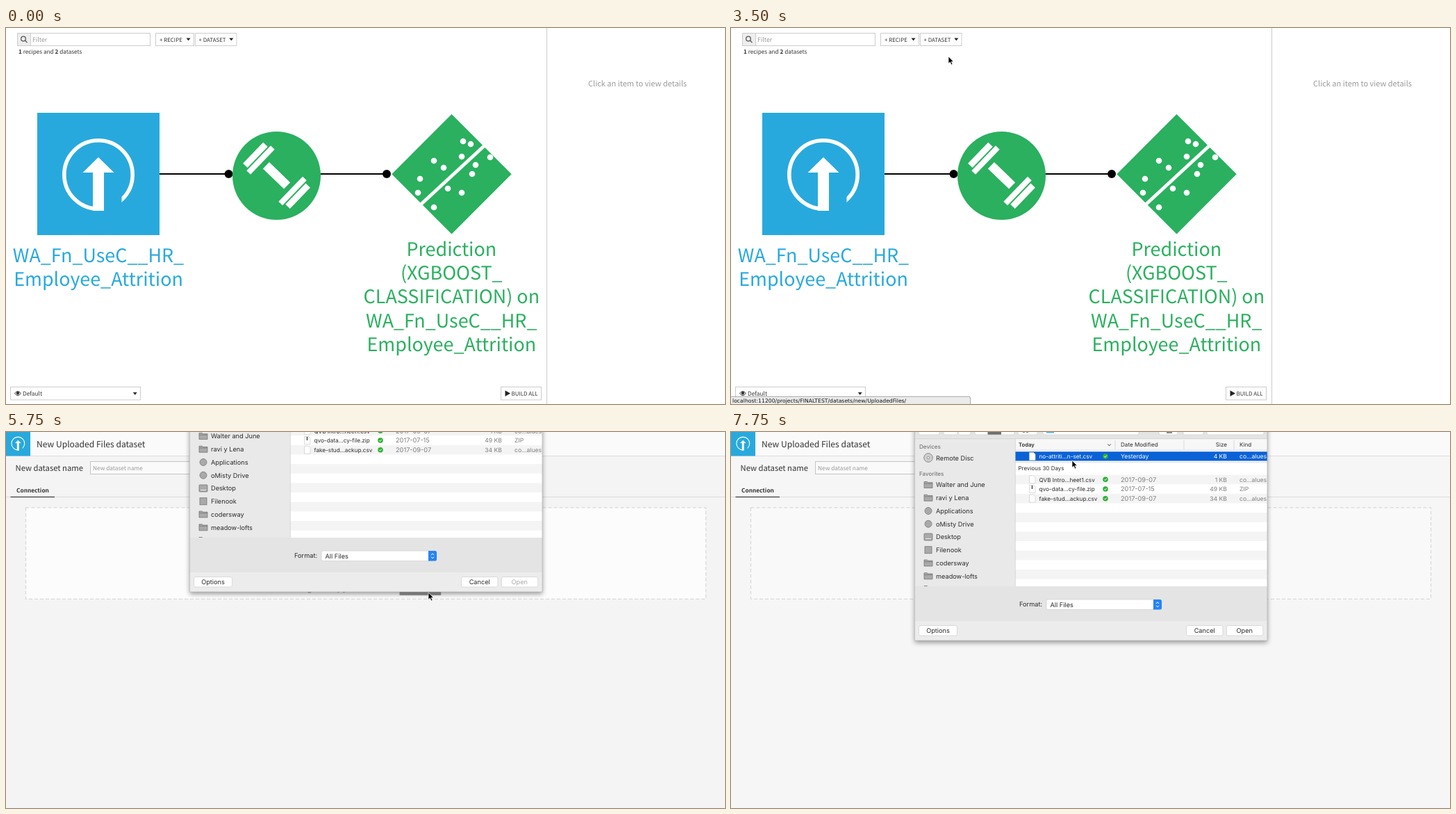
An HTML page that plays this animation: 1035x541 px, repeating every 8000 ms.

```html
<!DOCTYPE html>
<html lang="en">
<head>
<meta charset="utf-8">
<title>Dataset upload</title>
<style>
html, body { margin: 0; width: 100%; height: 100%; overflow: hidden; background: #fff; }
svg { display: block; width: 1035px; height: 541px; }
text { font-family: 'Noto Sans CJK JP', 'Noto Sans CJK SC', 'Noto Sans', sans-serif; font-size: 8.3px; fill: #333; text-rendering: geometricPrecision; white-space: pre; }
.big text { font-size: 26.9px; text-anchor: middle; }
.blue { fill: #28a9dd; }
.green, .big .green { fill: #2ab05f; }
.big .blue { fill: #28a9dd; }
.btn { font-size: 7.9px; }
.light { font-weight: 300; }
.box { fill: #fff; stroke: #ccc; }
.mac text { font-family: Inter, Roboto, sans-serif; font-size: 9.2px; fill: #2b2b2b; }
.mac .small { font-size: 8.1px; }
.mac .cell { font-size: 8.6px; fill: #7d7d7d; }
.mac .file { font-size: 8.2px; }
.mac .end { text-anchor: end; }
.mac .head { font-size: 8.1px; font-weight: 500; fill: #777; }
.ctl { fill: #fff; stroke: #cfcfcf; stroke-width: .7; }
.icon { fill: #a9a9a9; stroke: #777; stroke-width: .8; }

/* Every change lands on a 250 ms step: 3.125% of the loop */
.a { animation: 8s step-end infinite; }
#flow { animation-name: flow; }
#page { animation-name: page; }
#loading { animation-name: loading; }
#tabOn { animation-name: settled; }
#tabOff { animation-name: unsettled; }
#drop { animation-name: lift; }
#spin { animation-name: spin; transform-origin: 518px 262.5px; }
#status { animation-name: status; }
#sheet { animation-name: sheet; }
#cursor { animation-name: cursor; }
#back { animation-name: back; }
#zone { animation-name: zone; }
.pick { animation-name: pick; }
#bar { animation-name: bar; }
#open { animation-name: open; }

@keyframes flow { 0% { opacity: 1 } 46.875%, to { opacity: 0 } }
@keyframes page { 0% { opacity: 0 } 46.875%, to { opacity: 1 } }
@keyframes loading { 0% { opacity: 1 } 53.125%, to { opacity: 0 } }
@keyframes settled { 0% { opacity: 0 } 53.125%, to { opacity: 1 } }
@keyframes unsettled { 0% { opacity: 1 } 53.125%, to { opacity: 0 } }
@keyframes lift { 0% { transform: translateY(1.5px) } 53.125%, to { transform: none } }
@keyframes spin { 0% { transform: rotate(0deg) } 50%, to { transform: rotate(120deg) } }
@keyframes status { 0% { opacity: 0 } 37.5% { opacity: 1 } 56.25%, to { opacity: 0 } }
@keyframes sheet {
  0% { transform: translateY(-330px) }
  68.75% { transform: translateY(-220px) }
  71.875% { transform: translateY(-70px) }
  75% { transform: translateY(-4px) }
  78.125%, to { transform: none }
}
@keyframes back { 93.75%, to { fill: #f6f6f6 } }
@keyframes zone { 0% { fill: #f7f7f7 } 53.125% { fill: #fcfcfc } 93.75%, to { fill: #f9f9f9 } }
@keyframes pick { 93.75%, to { fill: #fff } }
@keyframes bar { 0% { opacity: 0 } 93.75%, to { opacity: 1 } }
@keyframes open { 0% { fill: #aaa } 93.75%, to { fill: #2b2b2b } }
@keyframes cursor {
  0% { transform: translate(-30px, -30px) }
  9.375% { transform: translate(591px, 1px) }
  12.5% { transform: translate(500px, 78px) }
  15.625% { transform: translate(400px, 58px) }
  18.75% { transform: translate(338px, 28px) }
  21.875% { transform: translate(321px, 19px) }
  31.25% { transform: translate(321px, 20px) }
  34.375% { transform: translate(318px, 29px) }
  37.5% { transform: translate(314px, 38px) }
  40.625% { transform: translate(313px, 40px) }
  43.75% { transform: translate(313px, 41px) }
  50% { transform: translate(330px, 55px) }
  53.125% { transform: translate(410px, 118px) }
  56.25% { transform: translate(520px, 195px) }
  59.375% { transform: translate(600px, 253px) }
  62.5% { transform: translate(621.5px, 270px) }
  65.625% { transform: translate(608px, 231px) }
  84.375% { transform: translate(597px, 200px) }
  87.5% { transform: translate(556px, 118px) }
  90.625% { transform: translate(510px, 56px) }
  93.75% { transform: translate(491px, 38px) }
  96.875%, to { transform: translate(491px, 41px) }
}
</style>
</head>
<body>
<svg viewBox="0 0 1035 541">
  <defs>
    <g id="upload">
      <circle cx="133" cy="211" r="49.2" fill="none" stroke="#fff" stroke-width="5.6"/>
      <path class="blue" d="M140 232H166.5V266H140Z"/>
      <path fill="#fff" d="M133 186L155.500 208H141V263H125V208H110.500Z"/>
    </g>
    <g id="plates" fill="#fff">
      <rect x="28" y="-25" width="8" height="50"/>
      <rect x="38" y="-21" width="9" height="42"/>
    </g>
    <path id="caret" d="M-3 -1.700H3L0 2Z" fill="#222"/>
    <path id="folder" class="icon" d="M-6 -4.500H-1.500L-.5 -3.300H6V4.500H-6ZM-6 -1.800H6"/>
    <g id="ok">
      <circle r="3.800" fill="#2eb135"/>
      <path d="M-1.800 0L-.5 1.400L1.800 -1.300" fill="none" stroke="#fff"/>
    </g>
    <path id="doc" d="M-4 -5.500H2L4.500 -3V5.500H-4Z" fill="#fff" stroke="#ccc" stroke-width=".7"/>
    <pattern id="stripes" y="61.500" width="363" height="27.300" patternUnits="userSpaceOnUse">
      <path fill="#f4f4f4" d="M0 0H363V13.650H0Z"/>
    </pattern>
    <filter id="shade" x="-5%" y="-5%" width="110%" height="112%">
      <feDropShadow dx="0" dy="3" stdDeviation="3.500" flood-opacity=".4"/>
    </filter>
  </defs>

  <g id="flow" class="a">
    <path fill="#fff" d="M0 0H1035V541H0Z"/>
    <path d="M778.500 0V541" stroke="#ccc"/>
    <rect class="box" x="16.500" y="7.500" width="191" height="18"/>
    <path d="M17 8H35V25H17Z" fill="#eee"/>
    <path d="M35.500 8V25" stroke="#ccc"/>
    <g fill="none" stroke="#555" stroke-width="1.300"><circle cx="25" cy="15.500" r="3.300"/><path d="M27.500 18L30.500 21"/></g>
    <text x="38" y="19.700" style="font-size:8.800px;fill:#999">Filter</text>
    <rect class="box" x="215.500" y="7.500" width="55" height="18"/>
    <rect class="box" x="272.500" y="7.500" width="59.500" height="18"/>
    <text class="btn" x="221" y="19.500">+ RECIPE</text>
    <text class="btn" x="277.500" y="19.500">+ DATASET</text>
    <use href="#caret" x="262.500" y="16.300"/>
    <use href="#caret" x="324.300" y="16.300"/>
    <text x="18" y="37" style="font-size:8.200px"><tspan font-weight="700">1</tspan> recipes and <tspan font-weight="700">2</tspan> datasets</text>
    <text class="light" x="838" y="84" style="font-size:11px;fill:#999">Click an item to view details</text>

    <path class="blue" d="M45 122H221V298H45Z"/>
    <use href="#upload"/>
    <path d="M221 210H320M452 210H548" stroke="#000" stroke-width="2"/>
    <circle cx="320.500" cy="210" r="6"/>
    <circle cx="548" cy="210" r="6"/>
    <circle class="green" cx="389.500" cy="212.500" r="63.500"/>
    <g transform="translate(389.500 212.300) rotate(44)">
      <use href="#plates"/>
      <use href="#plates" transform="scale(-1 1)"/>
      <rect x="-21" y="-6.500" width="42" height="13" fill="#fff"/>
    </g>
    <path class="green" d="M641.500 124L727.700 210.200L641.500 296.500L555.300 210.200Z"/>
    <path d="M597 254L689 169" stroke="#fff" stroke-width="5"/>
    <g id="dots" fill="#fff"></g>
    <g class="big">
      <text class="blue" x="133" y="337">WA_Fn_UseC__HR_</text>
      <text class="blue" x="133" y="371.300">Employee_Attrition</text>
      <text class="green" x="641.300" y="327.700">Prediction</text>
      <text class="green" x="641.300" y="362">(XGBOOST_</text>
      <text class="green" x="641.300" y="396.300">CLASSIFICATION) on</text>
      <text class="green" x="641.300" y="430.600">WA_Fn_UseC__HR_</text>
      <text class="green" x="641.300" y="464.900">Employee_Attrition</text>
    </g>

    <rect class="box" x="6.500" y="516.500" width="187" height="18.500"/>
    <path d="M12.500 525.700Q17 519.800 21.500 525.700Q17 531.600 12.500 525.700Z" fill="none" stroke="#333"/>
    <circle cx="17" cy="525.300" r="2.200" fill="#333"/>
    <text x="24" y="529">Default</text>
    <use href="#caret" x="185.700" y="526"/>
    <rect class="box" x="712.500" y="516.500" width="58" height="18.500"/>
    <path d="M718.500 521.500L726 525.700L718.500 530Z" fill="#222"/>
    <text class="btn" x="727.500" y="529">BUILD ALL</text>
  </g>

  <g id="page" class="a">
    <path id="back" class="a" fill="#f4f4f4" d="M0 0H1035V541H0Z"/>
    <path fill="#fafafa" d="M0 0H1035V34H0Z"/>
    <path d="M0 34.500H1035" stroke="#ddd"/>
    <path class="blue" d="M0 0H35V34.500H0Z"/>
    <use href="#upload" transform="translate(-8.100 -23.800) scale(.191)"/>
    <text class="light" x="44" y="22.300" style="font-size:12.100px">New Uploaded Files dataset</text>
    <text x="13.500" y="56" style="font-size:11.250px">New dataset name</text>
    <rect x="121.500" y="42.500" width="148" height="18" fill="#fafafa" stroke="#c4c4c4"/>
    <text x="125" y="55" style="fill:#999">New dataset name</text>
    <path d="M272 42.500H318.700V60H272Z" fill="#8bc28a"/>
    <path d="M277.500 48H282.500L284 49.500V54.500H277.500ZM279 48V50.500H282M279 54.500V52H282.500V54.500" fill="none" stroke="#fff" stroke-width=".8"/>
    <text class="btn" x="285.300" y="54.200" style="fill:#fff">CREATE</text>

    <g id="tabOff" class="a">
      <text x="15.700" y="87.500">Connection</text>
      <path d="M0 95H1035" stroke="#dcdcdc"/>
    </g>
    <g id="tabOn" class="a">
      <text x="15" y="87" font-weight="700">Connection</text>
      <path d="M0 93.500H1035" stroke="#dcdcdc"/>
      <path d="M6.500 93.500H70" stroke="#555" stroke-width="1.500"/>
    </g>
    <g id="drop" class="a">
      <rect id="zone" class="a" x="28.500" y="108.800" width="979" height="131.500" stroke="#d9d9d9" stroke-width="1.300" stroke-dasharray="5 3"/>
      <text class="light" x="518.500" y="181.300" text-anchor="middle" style="font-size:13.800px;fill:#999">No file yet</text>
      <text x="418.500" y="229" style="font-size:9.700px;fill:#555">Drag and drop your files here or</text>
      <path d="M566.500 216.500H626.200V235H566.500Z" fill="#999"/>
      <text x="573.500" y="229.500" font-weight="500" style="font-size:8.950px;fill:#fff">ADD A FILE</text>
    </g>
    <g id="loading" class="a">
      <circle cx="518" cy="262.500" r="21.700" fill="#777"/>
      <g id="spin" class="a" fill="#fff"></g>
    </g>

    <g id="sheet" class="a mac">
      <path filter="url(#shade)" fill="#ececec" d="M264.500 -40H772V300H264.500Z"/>
      <path fill="#e4e4e4" d="M264.500 -40H772V10H264.500Z"/>
      <g id="tools"></g>
      <path fill="#6e6e6e" d="M369.500 -16H389V3.700H369.500Z"/>
      <path fill="#54b4e8" d="M454 -6H465V1.500H454Z"/>
      <path d="M420 0H423M425 0H428M627 1H635" stroke="#666" stroke-width="1.500"/>
      <path fill="#e9e9e9" d="M264.500 10H409V222H264.500Z"/>
      <path fill="#fff" d="M409 10H772V222H409Z"/>
      <path fill="#f4f4f4" d="M409 28.500H772V42H409Z"/>
      <path fill="url(#stripes)" d="M409 61.500H772V222H409Z"/>
      <path fill="#f7f7f7" d="M409 10H772V26H409Z"/>
      <path d="M264.500 9.700H772M409 26.300H772M409 43.700H772M409.300 10V222M553 12V25M652 12V25M724 12V25" stroke="#d2d2d2" stroke-width=".8"/>
      <text class="small" x="414" y="21" font-weight="600" style="font-size:7.700px">Today</text>
      <path d="M542.300 17.500L544.500 19.800L546.700 17.500" fill="none" stroke="#333"/>
      <text class="small" x="561" y="21">Date Modified</text>
      <text class="small end" x="714" y="21">Size</text>
      <text class="small" x="732" y="21">Kind</text>
      <text class="small" x="413.500" y="54.700" style="font-size:8px">Previous 30 Days</text>
      <path id="bar" class="a" fill="#0b62d6" d="M409.500 28.300H772V41.500H409.500Z"/>
      <g id="files"></g>

      <text class="head" x="271" y="24">Devices</text>
      <circle class="icon" cx="284" cy="37" r="6.300" style="fill:#cfcfcf"/>
      <circle cx="284" cy="37" r="1.800" fill="#eee" stroke="#777" stroke-width=".7"/>
      <text x="295" y="40.500">Remote Disc</text>
      <text class="head" x="271" y="63">Favorites</text>
      <g id="places"></g>

      <path fill="#e4e4e4" d="M264.500 222H772V272H264.500Z"/>
      <path fill="#ececec" d="M264.500 272H772V300H264.500Z"/>
      <text x="415" y="251.300">Format:</text>
      <rect class="ctl" x="454" y="241" width="166" height="14.500" rx="2.500"/>
      <path fill="#2584f5" d="M608 241H617.500Q620 241 620 243.500V253Q620 255.500 617.500 255.500H608Z"/>
      <path d="M612 247L614 244.800L616 247M612 249.700L614 251.900L616 249.700" fill="none" stroke="#fff"/>
      <text x="459.500" y="251.700">All Files</text>
      <g text-anchor="middle">
        <rect class="ctl" x="270.500" y="278.500" width="55" height="14.500" rx="2.500"/>
        <text x="298" y="289.300">Options</text>
        <rect class="ctl" x="655.500" y="278.500" width="52.500" height="14.500" rx="2.500"/>
        <text x="681.700" y="289.300">Cancel</text>
        <rect class="ctl" x="713.300" y="278.500" width="52.500" height="14.500" rx="2.500"/>
        <text id="open" class="a" x="739.300" y="289.300">Open</text>
      </g>
      <path d="M264.500 0V300H772V0" fill="none" stroke="#b5b5b5" stroke-width=".7"/>
    </g>
  </g>

  <g id="status" class="a">
    <path d="M-1 530.300H342Q344.700 530.300 344.700 533V542H-1Z" fill="#ebebeb" stroke="#a8a8a8"/>
    <text x="2" y="539" style="font-family:'DejaVu Sans',sans-serif;font-size:7.700px;fill:#111">localhost:11200/projects/FINALTEST/datasets/new/UploadedFiles/</text>
  </g>
  <path id="cursor" class="a" d="M0 0V10.200L2.400 8L4.100 11.900L5.900 11.100L4.200 7.400H7.300Z" fill="#000" stroke="#fff" stroke-width=".7"/>
</svg>
<script>
const fill = (id, parts) => { document.getElementById(id).innerHTML = parts.join(''); };

const points = [[658, 163], [669, 167], [656, 185], [697, 186], [616, 191], [676, 197], [630, 201],
  [671, 210], [596, 217], [636, 231], [593, 237], [656, 237], [616, 258]];
fill('dots', points.map(([x, y]) => `<circle cx="${x}" cy="${y}" r="4.3"/>`));

// Spinner dots fade counter-clockwise from the brightest, upper right
fill('spin', [.92, .65, .45, .28, .25, .25].map((alpha, i) => {
  const a = -Math.PI / 3 * (1 + i);
  return `<circle cx="${518 + 11 * Math.cos(a)}" cy="${262.5 + 11 * Math.sin(a)}" r="4" opacity="${alpha}"/>`;
}));

const tools = [[270, 300], [306, 326], [327, 345], [351, 408], [413, 441], [449, 587], [616, 643], [651, 680], [685, 767]];
fill('tools', tools.map(([a, b]) => `<rect class="ctl" x="${a}" y="-16" width="${b - a}" height="20" rx="2.5"/>`));

const places = ['Walter and June', 'ravi y Lena', 'Applications', 'oMisty Drive', 'Desktop', 'Filenook', 'codersway', 'meadow-lofts', ''];
const dot = '<circle class="icon" r="5"/>';
const square = '<rect class="icon" x="-5" y="-5" width="10" height="10"/>';
const desk = '<rect class="icon" x="-6" y="-5" width="12" height="10" rx="1"/><path d="M-4 2.500H4" stroke="#eee"/>';
const icons = { 2: dot, 3: dot, 4: desk, 5: square };
fill('places', places.map((name, i) =>
  `<g transform="translate(284 ${76 + i * 18.75})">${icons[i] || '<use href="#folder"/>'}<text x="11" y="3.4">${name}</text></g>`));

const files = [
  [35, 'no-attriti...n-set.csv', 'Yesterday', '4 KB', 'co...alues'],
  [68.3, 'QVB Intro...heet1.csv', '2017-09-07', '1 KB', 'co...alues'],
  [82, 'qvo-data...cy-file.zip', '2017-07-15', '49 KB', 'ZIP'],
  [95.7, 'fake-stud...ackup.csv', '2017-09-07', '34 KB', 'co...alues']
];
fill('files', files.map(([y, name, date, size, kind], i) => {
  const cls = i ? '' : 'a pick';
  const cell = (x, text, extra) => `<text class="${extra} ${cls}" x="${x}" y="3.2">${text}</text>`;
  const zip = i === 2 ? '<path d="M433.5 -5V0" stroke="#444" stroke-width="1.5"/>' : '';
  return `<g transform="translate(0 ${y})"><use href="#doc" x="433.5"/>${zip}<use href="#ok" x="539"/>` +
    cell(443.5, name, 'file') +
    `<text class="cell ${cls}" x="561" y="3.2" ${i ? 'style="font-size:9.2px"' : ''}>${date}</text>` +
    cell(714, size, 'cell end') + cell(732, kind, 'cell') + '</g>';
}));
</script>
</body>
</html>
```
